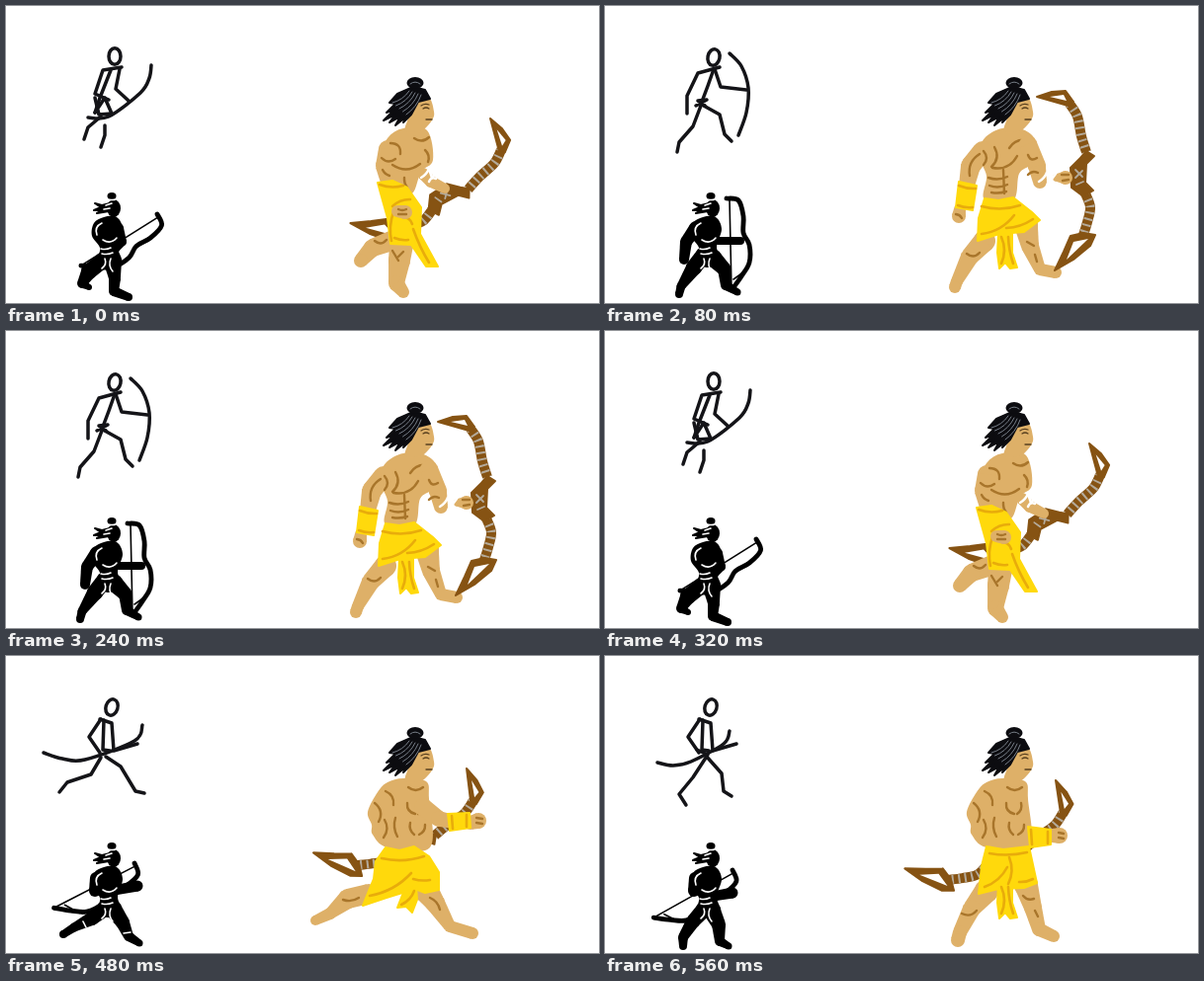
Animation of 600x301 px, one loop 640 ms. Source, as an HTML page with a canvas:

```html
<!DOCTYPE html>
<html lang="en">
<head>
<meta charset="utf-8">
<title>Archer run cycle</title>
<style>
html, body { margin: 0; width: 100%; height: 100%; overflow: hidden; background: #fff; }
canvas { display: block; }
</style>
</head>
<body>
<canvas id="stage" width="600" height="301"></canvas>
<script>
const ctx = document.getElementById('stage').getContext('2d');
const FRAME_MS = 80;
const SKIN = '#deb068', CLOTH = '#ffd90c', WOOD = '#865313', HAIR = '#0c0c10', INK = '#000';
const MARK = ['#a8752b', 2.4], FOLD = ['#e8ac0b', 2.6], WRAP = ['#fff', 2.5], CUT = ['#fff', 1.6];
const STICK = ['#141418', 3.5], WIRE = [INK, 1.6], BROW = ['#59401f', 1.3], SHINE = ['#777e88', 1];

// Traces points, bending the path through them when it is smooth.
function trace(n, closed, smooth) {
  const count = n.length / 2;
  const at = i => {
    const k = closed ? (i + count) % count : Math.max(0, Math.min(count - 1, i));
    return [n[k * 2], n[k * 2 + 1]];
  };
  ctx.beginPath();
  ctx.moveTo(n[0], n[1]);
  for (let i = 0; i < (closed ? count : count - 1); i++) {
    const [a, b, c, d] = [at(i - 1), at(i), at(i + 1), at(i + 2)];
    if (smooth) ctx.bezierCurveTo(b[0] + (c[0] - a[0]) / 6, b[1] + (c[1] - a[1]) / 6,
      c[0] - (d[0] - b[0]) / 6, c[1] - (d[1] - b[1]) / 6, c[0], c[1]);
    else ctx.lineTo(c[0], c[1]);
  }
}

function fill(color) {
  ctx.fillStyle = color;
  ctx.fill();
}

function stroke([color, width]) {
  ctx.strokeStyle = color;
  ctx.lineWidth = width;
  ctx.stroke();
}

function blob(color, ...n) { trace(n, true, true); fill(color); }

function poly(color, ...n) {
  trace(n, true, false);
  fill(color);
  if (color !== '#fff') stroke([color, 2]);
}

function line(style, ...n) { trace(n, false, false); stroke(style); }
function curve(style, ...n) { trace(n, false, true); stroke(style); }

// Short bowed strokes, five values each: both ends and the bend.
function arcs(style, ...n) {
  for (let i = 0; i < n.length; i += 5) {
    const [x, y, u, v, bend] = n.slice(i, i + 5);
    const k = 2 * bend / Math.hypot(u - x, v - y);
    ctx.beginPath();
    ctx.moveTo(x, y);
    ctx.quadraticCurveTo((x + u) / 2 - (v - y) * k, (y + v) / 2 + (u - x) * k, u, v);
    stroke(style);
  }
}

function oval(x, y, rx, ry, tilt = 0) {
  ctx.beginPath();
  ctx.ellipse(x, y, rx, ry, tilt, 0, Math.PI * 2);
}

// Tapered chain of joints, each given as x, y, radius.
function limb(color, ...n) {
  for (let i = 0; i < n.length; i += 3) {
    const [x, y, r, u, v, s] = n.slice(i, i + 6);
    oval(x, y, r, r);
    fill(color);
    if (s === undefined) return;
    const a = Math.atan2(v - y, u - x) + Math.PI / 2;
    const c = Math.cos(a), d = Math.sin(a);
    trace([x + c * r, y + d * r, u + c * s, v + d * s, u - c * s, v - d * s, x - c * r, y - d * r], true);
    fill(color);
  }
}

// Draws a rigid shape with its upper tip at x, y, turned by some degrees.
function placed(draw, tipX, tipY, x, y, degrees) {
  ctx.save();
  ctx.translate(x, y);
  ctx.rotate(degrees * Math.PI / 180);
  ctx.translate(-tipX, -tipY);
  draw();
  ctx.restore();
}

function bowLimb(...n) {
  ctx.lineCap = 'butt';
  curve([WOOD, 10], ...n);
  ctx.setLineDash([2, 4.5]);
  curve(['#b4aa9a', 9], ...n);
  ctx.setLineDash([]);
  ctx.lineCap = 'round';
}

function bowShape() {
  bowLimb(470, 99, 478, 112, 482, 132, 487, 148);
  bowLimb(486, 190, 491, 204, 488, 219, 484, 232);
  poly(WOOD, 437, 92, 452, 87, 466, 86, 474, 97, 472, 102);
  poly('#fff', 450, 92, 464, 90, 467, 96);
  poly(WOOD, 481, 154, 487, 147, 495, 152, 487, 160, 486, 179, 494, 187, 484, 193, 472, 184, 471, 164);
  arcs(['#b4aa9a', 1.8], 476, 166, 483, 173, 0, 476, 174, 483, 167, 0, 477, 181, 484, 178, 0);
  poly(WOOD, 471, 233, 484, 230, 496, 232, 491, 243, 474, 257, 455, 268, 464, 249);
  poly('#fff', 474, 239, 489, 236, 467, 257);
}

function inkBowShape() {
  line(WIRE, 126, 196, 128, 288);
  curve([INK, 4.8], 123, 195, 135, 197, 140, 213, 140, 230, 146, 242, 146, 260, 138, 274, 128, 288);
  line(WIRE, 130, 277, 144, 267);
}

const bow = (x, y, turn) => placed(bowShape, 437, 92, x, y, turn);
const inkBow = (x, y, turn) => placed(inkBowShape, 123, 195, x, y, turn);

function face() {
  blob(SKIN, 412, 91, 428, 93, 433, 107, 432, 114, 427, 121, 419, 127, 404, 127, 407, 113);
  poly(HAIR, 429, 94, 424, 85, 412, 82, 396, 89, 388, 98, 394, 99, 385, 108, 393, 105, 382, 116,
    394, 110, 388, 118, 399, 112, 394, 121, 404, 113, 402, 118, 410, 110, 417, 97);
  for (let i = 0; i < 5; i++)
    arcs(SHINE, 408 + i * 3, 86 + i, 391 + i * 3.5, 98 + i * 3, -2);
  oval(414, 78, 8.5, 6);
  fill(HAIR);
  arcs(SHINE, 409, 79, 419, 79, -2);
  arcs(BROW, 420, 101, 428, 100, -1, 422, 104, 428, 104, -1, 425, 115, 431, 115, 0);
}

function inkHead() {
  oval(109, 205, 7, 9);
  fill(INK);
  oval(107, 192.5, 4.5, 3.5);
  fill(INK);
  poly(INK, 105, 200, 97, 202, 90, 200, 96, 204, 89, 207, 98, 207, 92, 210, 104, 208);
  arcs(CUT, 101, 202, 107, 200, 0, 99, 206, 105, 205, 0, 104, 196.5, 110, 196.5, 0);
}

function inkTorso() {
  blob(INK, 99, 214, 112, 214, 118, 226, 113, 244, 117, 259, 104, 265, 93, 259, 95, 245, 87, 233, 89, 220);
  arcs(CUT, 97, 220, 92, 232, 3, 98, 237, 112, 235, 3, 96, 246, 106, 245, 1, 97, 251, 108, 250, 1,
    100, 256, 97, 266, -2, 106, 256, 108, 269, 2);
}

// Chest seen from the front
function chest() {
  blob(SKIN, 402, 124, 425, 126, 437, 140, 431, 160, 419, 170, 413, 197, 384, 196, 386, 172, 378, 152, 384, 134);
  arcs(MARK, 394, 143, 391, 163, -4, 392, 164, 417, 152, 5, 409, 144, 426, 136, -3, 388, 174, 407, 173, 2,
    389, 182, 407, 181, 2, 391, 189, 406, 188, 1, 403, 166, 404, 190, 0);
}

// Chest turned away
function back() {
  blob(SKIN, 402, 124, 425, 127, 428, 145, 429, 194, 386, 194, 371, 181, 370, 171, 366, 158, 376, 138, 386, 128);
  arcs(MARK, 384, 137, 392, 151, -3, 373, 149, 377, 168, -4, 383, 166, 382, 184, -3, 407, 133, 422, 133, 3,
    406, 149, 414, 160, 3, 421, 149, 417, 160, -2, 394, 164, 396, 183, 2, 409, 169, 413, 181, 2, 424, 171, 418, 181, -2);
}

function cuff(x, y) {
  arcs(WRAP, x - 8, y + 4, x, y - 5, 1, x, y - 5, x + 3, y + 4, 0, x + 3, y + 4, x + 9, y - 4, 0, x, y + 8, x + 7, y + 5, -2);
}

function longSash() {
  poly(CLOTH, 398, 230, 412, 230, 412, 250, 417, 265, 410, 266, 405, 260, 399, 266, 397, 250);
  arcs(FOLD, 401, 234, 401, 261, -3, 408, 234, 413, 261, 1);
}

function strideLegs() {
  limb(SKIN, 367, 241, 10, 346, 246, 10, 328, 261, 6, 313, 268, 5);
  limb(SKIN, 424, 236, 13, 434, 250, 10, 449, 274, 6, 472, 281, 6);
  poly(CLOTH, 384, 194, 398, 197, 413, 193, 428, 203, 438, 219, 438, 237, 424, 240, 414, 236, 385, 245, 361, 253, 372, 226, 374, 208);
  poly(CLOTH, 403, 237, 415, 233, 416, 247, 411, 260, 405, 254, 396, 255);
  arcs(FOLD, 380, 205, 423, 203, 3, 368, 243, 410, 220, 4, 412, 226, 429, 227, 1, 413, 238, 400, 252, -2);
  arcs(MARK, 341, 247, 357, 245, 2, 429, 245, 439, 257, -2);
}

const stickLegs = {
  long() {
    line(STICK, 96, 103, 86, 120, 62, 128, 54, 138);
    line(STICK, 101, 102, 116, 112, 131, 137, 140, 139);
  }
};

function inkStrideLegs() {
  limb(INK, 100, 256, 8, 87, 266, 7, 69, 275, 4.5, 58, 282, 4);
  limb(INK, 108, 256, 9, 118, 270, 7, 124, 284, 5, 135, 291, 3.5);
  arcs(CUT, 78, 269, 81, 275, 0, 119, 281, 126, 280, 0);
}

function stickTurnBody() {
  line(STICK, 95, 64, 107, 68, 109, 96, 133, 89);
  line(STICK, 96, 64, 84, 82, 95, 98);
  line(STICK, 99, 65, 98, 95, 105, 96);
}

function stickHead(x, y, tilt) {
  oval(x, y, 6, 8.3, tilt);
  stroke(STICK);
}

function pass() {
  stickHead(110, 51, 0);
  line(STICK, 117, 62, 98, 65, 90, 89, 104, 95);
  line(STICK, 106, 65, 95, 93, 90, 108);
  line(STICK, 115, 64, 111, 84, 124, 96);
  line(STICK, 90, 93, 94, 110, 107, 109, 100, 93, 90, 108);
  line(STICK, 96, 112, 83, 123, 79, 135);
  line(STICK, 100, 121, 100, 131, 96, 143);
  curve(STICK, 147, 60, 145, 73, 136, 88, 104, 112, 83, 113);

  inkBow(153, 211, 59);
  limb(INK, 99, 257, 8, 84, 269, 8, 77, 281, 5, 84, 285, 3);
  limb(INK, 108, 260, 9, 110, 276, 6, 109, 289, 5, 124, 295, 4);
  limb(INK, 114, 225, 5, 118, 239, 4, 111, 246, 4);
  inkTorso();

  bow(490, 114, 59);
  limb(SKIN, 390, 238, 10, 371, 245, 9, 359, 258, 7);
  limb(SKIN, 400, 242, 12, 398, 258, 11, 395, 281, 8, 402, 290, 6);
  blob(SKIN, 402, 124, 426, 126, 432, 156, 420, 168, 411, 190, 394, 188, 380, 174, 377, 156, 386, 134);
  limb(SKIN, 386, 145, 9, 383, 162, 9, 387, 178, 8);
  limb(SKIN, 422, 170, 6, 430, 178, 6, 444, 185, 5);
  arcs(MARK, 389, 139, 399, 150, -4, 380, 154, 394, 155, 3, 381, 166, 388, 172, 1, 391, 161, 419, 160, 5,
    413, 134, 428, 133, 3, 403, 174, 406, 184, 1, 424, 146, 427, 158, -2, 373, 238, 385, 237, 3, 391, 248, 397, 258, 0, 402, 249, 397, 254, 0);
  poly(CLOTH, 376, 179, 391, 177, 406, 184, 420, 204, 419, 231, 437, 264, 425, 264, 410, 242, 389, 241, 386, 215);
  arcs(FOLD, 378, 181, 402, 182, 2, 391, 203, 409, 196, -2, 392, 209, 390, 238, 2, 412, 226, 428, 260, 1, 402, 214, 411, 221, -2, 393, 235, 407, 237, 1);
  limb(SKIN, 396, 208, 6, 404, 209, 7);
  arcs(MARK, 397, 206, 405, 206, 1, 397, 211, 405, 211, 0);
  cuff(428, 170);
}

function mid() {
  stickHead(110, 52, .2);
  line(STICK, 116, 62, 94, 68, 83, 91, 83, 109);
  line(STICK, 110, 64, 104, 81, 98, 97);
  line(STICK, 111, 64, 117, 82, 143, 85);
  line(STICK, 92, 101, 103, 95, 94, 96, 101, 101);
  line(STICK, 97, 101, 89, 122, 75, 138, 73, 148);
  line(STICK, 98, 100, 116, 110, 121, 130, 128, 137);
  curve(STICK, 126, 48, 138, 61, 145, 83, 143, 108, 135, 131);

  inkBow(123, 195, 0);
  limb(INK, 92, 225, 7, 82, 239, 6, 80, 257, 5);
  limb(INK, 114, 238, 4, 137, 238, 4);
  limb(INK, 100, 252, 8, 90, 265, 8, 77, 284, 4.5, 75, 292, 4);
  limb(INK, 109, 255, 9, 121, 267, 7, 122, 283, 5, 134, 290, 3.5);
  inkTorso();

  chest();
  limb(SKIN, 382, 147, 10, 370, 162, 10, 366, 182, 8);
  limb(SKIN, 359, 206, 6, 358, 213, 7);
  limb(SKIN, 428, 140, 9, 437, 162, 9, 440, 178, 7);
  arcs(MARK, 379, 150, 369, 172, 4, 383, 147, 383, 161, -3, 428, 151, 437, 154, 3, 428, 171, 438, 169, -2, 355, 211, 361, 215, -1);
  poly(CLOTH, 358, 178, 376, 182, 372, 207, 355, 204);
  arcs(FOLD, 358, 182, 375, 185, 1, 357, 202, 372, 204, 1);
  limb(SKIN, 384, 238, 11, 369, 254, 9, 356, 279, 6, 354, 285, 6);
  limb(SKIN, 426, 222, 12, 430, 243, 9, 440, 267, 6, 456, 270, 6);
  arcs(MARK, 366, 251, 379, 250, 3, 427, 239, 434, 243, 0, 435, 252, 437, 259, 0);
  poly(CLOTH, 384, 195, 398, 197, 413, 194, 432, 209, 440, 217, 424, 229, 399, 231, 377, 238, 378, 215);
  longSash();
  arcs(FOLD, 381, 203, 420, 202, 3, 381, 231, 414, 212, 4, 406, 225, 433, 216, 2);
  bow(437, 92, 0);
  limb(SKIN, 457, 174, 4, 466, 174, 7);
  arcs(MARK, 462, 171, 469, 171, 0, 463, 177, 469, 176, 0);
  cuff(447, 174);
}

function stride() {
  stickHead(109, 51, .3);
  line(STICK, 110, 61, 92, 67, 73, 77, 71, 96);
  line(STICK, 106, 61, 98, 97);
  line(STICK, 112, 61, 123, 81, 141, 72);
  line(STICK, 90, 98, 104, 96, 98, 102, 91, 99);
  stickLegs.long();
  curve(STICK, 114, 41, 130, 50, 146, 70, 153, 91, 149, 112);

  inkBow(114, 191, -20);
  limb(INK, 92, 224, 7, 76, 232, 7, 73, 248, 5);
  limb(INK, 114, 224, 6, 122, 234, 5, 139, 227, 3);
  inkStrideLegs();
  inkTorso();

  chest();
  limb(SKIN, 384, 146, 10, 362, 152, 10, 346, 164, 8);
  limb(SKIN, 347, 193, 6, 344, 197, 8);
  limb(SKIN, 430, 139, 9, 439, 159, 9, 450, 170, 7);
  arcs(MARK, 365, 144, 382, 151, 3, 357, 151, 366, 156, 1, 427, 146, 432, 156, -2, 437, 160, 445, 164, 1, 340, 196, 349, 196, 1);
  poly(CLOTH, 339, 161, 361, 167, 354, 189, 335, 187);
  arcs(FOLD, 340, 165, 359, 169, 1, 336, 185, 353, 187, 1);
  strideLegs();
  bow(422, 82, -19);
  limb(SKIN, 464, 154, 5, 473, 151, 8);
  arcs(MARK, 469, 147, 476, 149, 0, 470, 154, 476, 154, 0);
  cuff(456, 162);
}

function turn() {
  stickHead(107, 52, .3);
  stickTurnBody();
  line(STICK, 93, 95, 104, 100, 89, 123, 75, 140, 82, 151);
  line(STICK, 102, 101, 118, 119, 120, 137, 128, 142);
  curve(STICK, 53, 108, 69, 111, 87, 107, 120, 89, 126, 76);

  inkBow(129, 217, 62);
  limb(INK, 91, 225, 6, 90, 238, 6);
  limb(INK, 112, 243, 5, 129, 240, 5.5);
  limb(INK, 100, 257, 8, 89, 269, 7, 79, 285, 5, 79, 294, 4);
  limb(INK, 108, 258, 9, 115, 272, 7, 116, 289, 5, 125, 294, 3.5);
  inkTorso();

  bow(456, 126, 65.5);
  back();
  limb(SKIN, 386, 238, 12, 371, 256, 9, 359, 280, 7, 357, 288, 7);
  limb(SKIN, 426, 232, 12, 433, 255, 9, 439, 277, 7, 454, 284, 6);
  arcs(MARK, 361, 261, 376, 258, 3, 423, 243, 434, 246, 2, 435, 258, 438, 264, 0);
  poly(CLOTH, 386, 193, 403, 196, 429, 193, 437, 230, 424, 235, 398, 236, 378, 241, 381, 213);
  longSash();
  arcs(FOLD, 389, 200, 427, 199, 2, 409, 204, 408, 231, -3, 384, 234, 407, 214, 3, 419, 229, 433, 226, 1);
  limb(SKIN, 452, 182, 7, 460, 182, 8);
  arcs(MARK, 459, 179, 464, 180, 0, 459, 184, 464, 185, 0);
  poly(CLOTH, 428, 173, 451, 176, 451, 191, 430, 194);
  arcs(FOLD, 431, 176, 432, 191, 0, 448, 178, 448, 190, 0);
}

function reach() {
  stickHead(107, 52, .3);
  stickTurnBody();
  stickLegs.long();
  curve(STICK, 38, 98, 57, 104, 80, 105, 130, 86, 138, 70);

  inkBow(130, 210, 64);
  limb(INK, 91, 225, 6, 90, 238, 6);
  limb(INK, 112, 237, 5, 133, 233, 5.5);
  inkStrideLegs();
  inkTorso();

  bow(466, 114, 67);
  back();
  limb(SKIN, 422, 153, 9, 438, 165, 8, 453, 168, 7);
  strideLegs();
  limb(SKIN, 470, 169, 7, 478, 167, 8);
  arcs(MARK, 476, 164, 482, 165, 0, 476, 169, 482, 170, 0);
  poly(CLOTH, 447, 160, 469, 159, 470, 174, 449, 177);
  arcs(FOLD, 451, 162, 452, 175, 0, 466, 161, 466, 173, 0);
}

const cycle = [pass, mid, stride, mid, pass, turn, reach, turn];

function drawPose(pose) {
  ctx.fillStyle = '#fff';
  ctx.fillRect(0, 0, 600, 301);
  ctx.lineJoin = ctx.lineCap = 'round';
  pose();
  inkHead();
  face();
}

let shown;
function tick(now) {
  const pose = cycle[Math.floor(now / FRAME_MS) % cycle.length];
  if (pose !== shown) drawPose(shown = pose);
  requestAnimationFrame(tick);
}
tick(performance.now());
</script>
</body>
</html>
```
